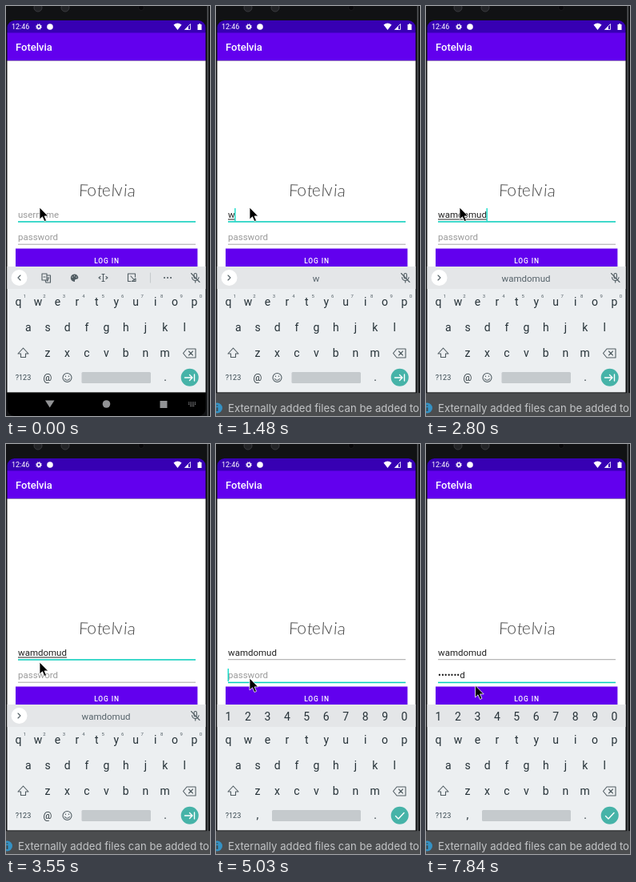
An HTML page for the animation above (7990 ms loop, 255 px wide and 513 px high).

```html
<!DOCTYPE html>
<html lang="en">
<head>
<meta charset="utf-8">
<title>Login screen</title>
<style>
  html, body { margin: 0; width: 100%; height: 100%; overflow: hidden; background: #111214; }
  svg { display: block; width: 100vw; height: 100vh; }
  text { font-family: Roboto, sans-serif; }
  .mid { text-anchor: middle; }
  .field { font-size: 11.5px; fill: #212121; }
  .hint { fill: #9b9b9b; }
  .key { font-size: 14px; fill: #263238; text-anchor: middle; }
  .sup { font-size: 6px; fill: #546067; text-anchor: middle; }
  .line { fill: none; stroke: #505c62; stroke-width: 1.1; stroke-linejoin: round; stroke-linecap: round; }
  .white { fill: none; stroke: #fff; stroke-width: 1.4; stroke-linecap: round; stroke-linejoin: round; }
</style>
</head>
<body>
<svg viewBox="0 0 255 513" xmlns="http://www.w3.org/2000/svg">
  <!-- phone body -->
  <rect width="255" height="513" fill="#111214"/>
  <rect x="1.5" y="18" width="248" height="495" rx="9" fill="#000"/>
  <rect x="251.5" width="1.5" height="513" fill="#55575a"/>
  <g fill="#222326" stroke="#3a3b3f">
    <circle cx="40" cy="2" r="5"/>
    <circle cx="74" cy="2" r="5"/>
    <circle cx="169" cy="2" r="3.5" fill="#08080a" stroke="#1b1b1e"/>
  </g>

  <!-- status and app bars -->
  <path d="M1.5 34V27A9 9 0 0 1 10.5 18H240.5A9 9 0 0 1 249.5 27V34Z" fill="#3700b3"/>
  <g fill="#fff">
    <text x="7" y="29" font-size="9">12:46</text>
    <circle cx="41" cy="26" r="2.2" fill="none" stroke="#fff" stroke-width="1.6"/>
    <circle cx="41" cy="26" r="3.4" fill="none" stroke="#fff" stroke-dasharray="1.3 1.37"/>
    <circle cx="55" cy="26" r="3.8"/>
    <path d="M209.5 23.5Q214.5 19.5 219.5 23.5L214.5 30Z"/>
    <path d="M223.5 29.5L230.5 22.5V29.5Z" fill="none" stroke="#fff" stroke-width=".8"/>
    <path d="M224 29.5L228 25.5V29.5Z"/>
    <path d="M239.5 23H241V22H243V23H244.5V30H239.5Z"/>
  </g>
  <rect x="1.5" y="33.5" width="248" height="35" fill="#6200ee"/>
  <text x="12" y="56" font-size="13" font-weight="500" fill="#fff">Fotelvia</text>

  <!-- form -->
  <rect x="1.5" y="68.5" width="248" height="258" fill="#fff"/>
  <text class="mid" x="126" y="238" rotate="2 -5 5 -4 3 -5 4 5" style="font:300 21px Lato,sans-serif" fill="#444">Fotelvia</text>
  <rect id="userLine" x="15" width="222"/>
  <rect id="passLine" x="15" width="222"/>
  <text id="user" class="field" x="15" y="265"></text>
  <text id="pass" class="field" x="15" y="293.2"></text>
  <rect id="underline" x="15" y="266.5" height="1" fill="#212121"/>
  <rect id="caret" width="1.3" height="16" fill="#03dac5"/>
  <rect x="12" y="303.5" width="227.4" height="24" fill="#6200ee"/>
  <text class="mid" x="126" y="322.2" font-size="8.5" font-weight="500" letter-spacing=".85" fill="#fff">LOG IN</text>

  <!-- keyboard -->
  <rect x="1.5" y="326" width="248" height="157.4" fill="#eceff1"/>
  <rect x="1.5" y="326" width="248" height="28" fill="#e4e6e8"/>
  <g id="letters"></g>
  <g id="digits"></g>
  <path class="line" d="M21.5 428L28 435H24.500V439.500H18.500V435H15Z"/>
  <path class="line" d="M226 429H237V440H226L221.500 434.500ZM228.500 432L233.500 437M233.500 432L228.500 437"/>
  <text class="mid" x="21.5" y="468" font-size="9" fill="#37474f">?123</text>
  <text class="key" x="199" y="469">.</text>
  <circle cx="229.7" cy="464.8" r="11" fill="#46b3a8"/>

  <g id="textMode">
    <g id="supers"></g>
    <text class="key" x="52" y="469" style="font-size:12px">@</text>
    <circle class="line" cx="76.5" cy="465" r="5.5"/>
    <path class="line" d="M73.5 466.500Q76.500 470 79.500 466.500M74.500 463V463.500M78.500 463V463.500"/>
    <rect x="94.5" y="458" width="86.5" height="14" rx="1.5" fill="#c5cacd"/>
    <path class="white" d="M223.5 465H232.500M229.500 461.500L233 465L229.500 468.500M235.500 461V469"/>
    <circle cx="16.5" cy="340" r="10" fill="#fff"/>
    <path id="chevron" class="line"/>
    <g class="line">
      <rect x="235" y="334.5" width="3.4" height="6.5" rx="1.7"/>
      <path d="M232.5 339.500Q233 343.500 236.700 343.500T241 339.500M236.700 343.500V346M231.500 334.500L242 345.500"/>
    </g>
    <text id="suggestion" class="field mid" x="125" y="344.5" style="fill:#56636a"></text>
    <g id="tools" class="line">
      <path d="M45 335H51V343H45ZM51 337H55.500V346H50L49 343M47 339H49M52 340H54M53 340Q53 343 51.500 344"/>
      <path d="M86 345A4.800 4.800 0 1 1 90.400 340Q90.400 341.800 88 341.800T86 345Z" fill="#505c62" stroke="none"/>
      <path d="M83 339V339.200M85.500 337.500V337.700M88 339V339.200" stroke="#e4e6e8"/>
      <path d="M121.5 335.500V344.500M120 335.500H123M120 344.500H123M118 338.500L116 340L118 341.500M125 338.500L127 340L125 341.500"/>
      <path d="M161.5 339V335H152.500V344.500H156M156 338L160.500 343M157.500 344.500H162V341Z"/>
      <path d="M180.5 334V346" stroke="#c6cacc"/>
      <path d="M198 340H198.100M202 340H202.100M206 340H206.100" style="stroke-width:2"/>
    </g>
  </g>
  <g id="passMode">
    <text class="key" x="52" y="469">,</text>
    <rect x="70" y="458" width="111" height="14" rx="1.5" fill="#c5cacd"/>
    <path class="white" d="M224.5 465.500L228 469L235 461.500"/>
  </g>

  <!-- navigation bar and notice -->
  <g fill="#929395">
    <path d="M49 493.500H60.500L54.700 502.500Z"/>
    <circle cx="125.5" cy="498" r="4.8"/>
    <rect x="192.5" y="494" width="9" height="9"/>
    <path d="M228 496H238M228 498.200H238M230 500.400H236" fill="none" stroke="#929395" stroke-width="1.2" stroke-dasharray="1.2 .8"/>
  </g>
  <g id="banner">
    <rect y="484.2" width="255" height="28.8" fill="#4b4d4f"/>
    <circle cx="1.5" cy="503" r="6.5" fill="#3592c4"/>
    <path d="M1.5 499.200V500.400M1.500 502.200V507" stroke="#3d4144" stroke-width="1.8"/>
    <text x="15" y="508" style="font:13.2px Inter,sans-serif" fill="#c3c5c7">Externally added files can be added to</text>
  </g>

  <path id="mouse" d="M0 0V15L3.500 11.800L6 17.500L8.500 16.400L6.100 10.900H10.700Z" fill="#000" stroke="#fff" stroke-width=".8"/>
</svg>

<script>
const LOOP = 7990;
const NAME = "wamdomud";
const PITCH = 24.45;
const $ = id => document.getElementById(id);

// Each step changes only the listed parts of the state.
const steps = [
  [0, { user: 0, pass: 0, caret: 0, banner: 0, focus: "user", numeric: 0, x: 42, y: 252 }],
  [450, { caret: 1, banner: 1 }],
  [890, { caret: 0 }],
  [1480, { user: 1, caret: 1 }],
  [1630, { user: 2 }],
  [1780, { user: 3 }],
  [1920, { user: 4 }],
  [2360, { user: 5 }],
  [2510, { user: 6 }],
  [2650, { user: 7 }],
  [2800, { user: 8 }],
  [3250, { caret: 0 }],
  [3400, { y: 259 }],
  [3550, { y: 273 }],
  [3690, { y: 286, caret: 1 }],
  [3840, { y: 293 }],
  [3990, { focus: "pass" }],
  [4140, { numeric: 1 }],
  [4580, { caret: 0 }],
  [5030, { caret: 1 }],
  [5320, { pass: 1 }],
  [5470, { pass: 2 }],
  [5620, { pass: 3 }],
  [5770, { pass: 4 }],
  [6370, { caret: 0 }],
  [6510, { pass: 5, caret: 1 }],
  [6650, { pass: 6 }],
  [7240, { pass: 7 }],
  [7390, { pass: 8 }],
  [7840, { caret: 0, x: 61.5, y: 302 }]
];

function addRow(group, chars, x, y, cls = "key") {
  [...chars].forEach((char, i) => {
    const text = document.createElementNS("http://www.w3.org/2000/svg", "text");
    text.setAttribute("class", cls);
    text.setAttribute("x", x + i * PITCH);
    text.setAttribute("y", y);
    text.textContent = char;
    $(group).append(text);
  });
}
addRow("letters", "qwertyuiop", 15.5, 375);
addRow("letters", "asdfghjkl", 27.7, 406.5);
addRow("letters", "zxcvbnm", 52, 438.5);
addRow("digits", "1234567890", 15.5, 345.5);
addRow("supers", "1234567890", 23.5, 364.5, "sup");

const show = (id, on) => { $(id).style.display = on ? "" : "none"; };

function setField(id, value, hint) {
  $(id).textContent = value || hint;
  $(id).classList.toggle("hint", !value);
  return value ? $(id).getComputedTextLength() : 0;
}

function setLine(id, y, focused) {
  $(id).setAttribute("y", y);
  $(id).setAttribute("height", focused ? 1.5 : 1);
  $(id).setAttribute("fill", focused ? "#03cdbb" : "#a5a5a5");
}

function render(s) {
  const typed = NAME.slice(0, s.user);
  const masked = s.pass ? "•".repeat(s.pass - 1) + NAME[s.pass - 1] : "";
  const widths = {
    user: setField("user", typed, "username"),
    pass: setField("pass", masked, "password")
  };
  const onUser = s.focus === "user";
  setLine("userLine", 269.2, onUser);
  setLine("passLine", 297.7, !onUser);
  $("underline").setAttribute("width", widths.user);
  show("underline", onUser && s.user);
  $("caret").setAttribute("x", 14.6 + widths[s.focus]);
  $("caret").setAttribute("y", onUser ? 253 : 281);
  show("caret", s.caret);

  $("suggestion").textContent = typed;
  $("chevron").setAttribute("d", s.user ? "M15 337L18 340L15 343" : "M18 337L15 340L18 343");
  show("tools", !s.user);
  show("textMode", !s.numeric);
  show("passMode", s.numeric);
  show("digits", s.numeric);
  show("banner", s.banner);
  $("mouse").setAttribute("transform", `translate(${s.x} ${s.y})`);
}

const start = performance.now();
let shown = 0;
function tick(now) {
  const time = Math.max(0, now - start) % LOOP;
  const count = steps.filter(([at]) => at <= time).length;
  if (count !== shown) {
    shown = count;
    render(Object.assign({}, ...steps.slice(0, count).map(([, change]) => change)));
  }
  requestAnimationFrame(tick);
}
tick(start);
</script>
</body>
</html>
```
